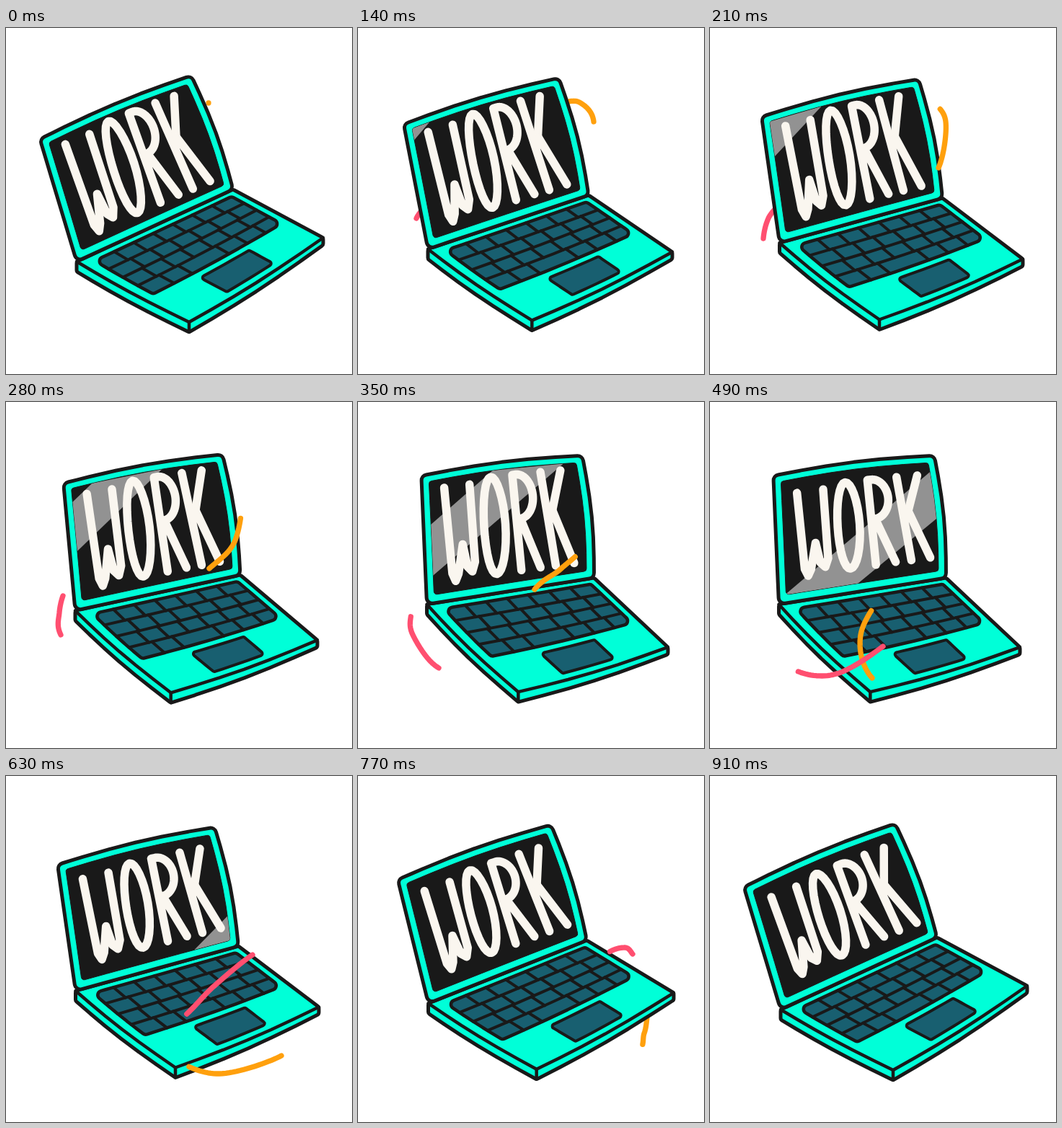
An HTML page with a canvas for the animation above (980 ms loop, 480 by 480 pixels).

```html
<!DOCTYPE html>
<html lang="en">
<head>
<meta charset="utf-8">
<title>Work</title>
<style>
html, body { margin: 0; width: 100%; height: 100%; overflow: hidden; background: #fff; }
canvas { display: block; width: 480px; height: 480px; }
</style>
</head>
<body>
<canvas id="stage" width="480" height="480"></canvas>
<script>
const ctx = document.getElementById('stage').getContext('2d');
const STEP = 70, STEPS = 14;
const INK = '#191919', MINT = '#00ffd8', TEAL = '#185f70', CREAM = '#faf6ef';

const mix = (a, b, t) => a + (b - a) * t;
const mixPoint = (p, q, t) => [mix(p[0], q[0], t), mix(p[1], q[1], t)];
const range = n => Array.from({ length: n }, (_, i) => i);

// Laptop corners at both ends of the swing.
const corners = {
  lidLeft: [[47, 154], [96, 92]],
  lidRight: [[257, 66], [322, 76]],
  hingeLeft: [[98, 324], [95, 272]],
  hingeRight: [[315, 224], [330, 248]],
  front: [[254, 408], [216, 401]],
  right: [[440, 291], [428, 350]]
};

// Streak paths: one knot for every step of the leading end.
const orange = {
  color: '#ffa00d', first: 0, lag: 1.5, frontFrom: 3, frontTo: 9,
  knots: [[281, 104], [307, 103], [327, 130], [317, 194], [282, 231], [245, 260],
    [209, 323], [225, 383], [292, 413], [382, 388], [397, 357], [401, 335]]
};
const pink = {
  color: '#ff4f70', first: 1, lag: 1.8, frontFrom: 6, frontTo: 11,
  knots: [[95, 246], [81, 264], [74, 292], [76, 323], [112, 369], [172, 378],
    [240, 339], [288, 292], [342, 248], [370, 238], [381, 247]]
};

// Maps (u, v) into a four-cornered surface whose sides bow outwards.
function surface([a, b, c, d], bow) {
  return (u, v) => {
    const [x, y] = mixPoint(mixPoint(a, b, u), mixPoint(d, c, u), v);
    const across = Math.sin(Math.PI * u), down = Math.sin(Math.PI * v);
    return [x + down * mix(-bow.left, bow.right, u), y + across * mix(-bow.top, bow.bottom, v)];
  };
}

const inset = (map, u0, v0, u1, v1) => (u, v) => map(mix(u0, u1, u), mix(v0, v1, v));

const sidePoints = (map, u0, v0, u1, v1) =>
  range(7).map(i => map(mix(u0, u1, i / 6), mix(v0, v1, i / 6)));

const outline = map => [
  ...sidePoints(map, 0, 0, 1, 0).slice(1), ...sidePoints(map, 1, 0, 1, 1).slice(1),
  ...sidePoints(map, 1, 1, 0, 1).slice(1), ...sidePoints(map, 0, 1, 0, 0).slice(1)
];

function trace(points, radius) {
  ctx.beginPath();
  ctx.moveTo(...mixPoint(points[points.length - 1], points[0], .5));
  points.forEach((p, i) => ctx.arcTo(...p, ...points[(i + 1) % points.length], radius));
  ctx.closePath();
}

function shape(points, radius, fill, width) {
  trace(points, radius);
  ctx.fillStyle = fill;
  ctx.fill();
  ctx.strokeStyle = INK;
  ctx.lineWidth = width;
  ctx.stroke();
}

function line(points, color, width) {
  ctx.beginPath();
  points.forEach(p => ctx.lineTo(...p));
  ctx.strokeStyle = color;
  ctx.lineWidth = width;
  ctx.stroke();
}

// Catmull-Rom curve; s counts knots.
function along(knots, s) {
  const i = Math.min(Math.floor(s), knots.length - 2), t = s - i;
  const p = n => knots[Math.max(0, Math.min(knots.length - 1, i + n))];
  return [0, 1].map(k => {
    const a = p(-1)[k], b = p(0)[k], c = p(1)[k], d = p(2)[k];
    return b + t / 2 * (c - a + t * (2 * a - 5 * b + 4 * c - d + t * (3 * (b - c) + d - a)));
  });
}

function drawStreak({ color, first, lag, knots, frontFrom, frontTo }, step, front) {
  const head = step - first, tail = Math.max(0, head - lag);
  if (head < 0 || head >= knots.length) return;
  if (front !== (step >= frontFrom && step <= frontTo)) return;
  line(range(31).map(i => along(knots, mix(tail, head, i / 30))), color, 7.3);
}

function drawBase(at) {
  const plate = surface([at.hingeLeft, at.hingeRight, at.right, at.front],
    { top: 0, right: 0, bottom: 4, left: 5 });
  const edge = [...sidePoints(plate, 0, 0, 0, 1), ...sidePoints(plate, 0, 1, 1, 1).slice(1)];
  const underside = edge.map(([x, y], i) => [x, y + (i < 7 ? 14 : mix(14, 10, (i - 6) / 6))]);
  shape([...underside, at.right, at.hingeRight, at.hingeLeft], 4, MINT, 5);
  line(edge, INK, 4.5);
  line([edge[6], underside[6]], INK, 4.5);

  const keys = inset(plate, .07, .07, .95, .62);
  shape(outline(keys), 6, TEAL, 4.5);
  for (let row = 0; row < 4; row++) {
    const top = row / 4, bottom = top + .25;
    if (row) line(sidePoints(keys, 0, top, 1, top), INK, 4);
    for (let key = 1; key < 7; key++) {
      const u = key / 7 + .02 * (row % 2), spaceBar = row === 3 && key === 3;
      if (!spaceBar) line([keys(u, top), keys(u, bottom)], INK, 4);
    }
  }
  shape(outline(inset(plate, .34, .69, .68, .93)), 3, TEAL, 4);
}

function drawGlare(screen, step) {
  const trail = -.75 + .17 * step + .0133 * step * step, lead = trail + .48;
  ctx.save();
  trace(outline(screen), 4);
  ctx.clip();
  ctx.beginPath();
  [trail, lead].forEach(u => ctx.lineTo(...screen(u, 0)));
  [lead, trail].forEach(u => ctx.lineTo(...screen(u - 1.1, 1)));
  ctx.fillStyle = '#929292';
  ctx.fill();
  ctx.restore();
}

function drawWord(screen, small) {
  const area = small ? inset(screen, 0, .055, 1.03, .945) : screen;
  const stroke = points => line(points.map(p => area(...p)), CREAM, 11.5);
  const arc = (u, v, ru, rv, from, to) => range(33).map(i => {
    const a = mix(from, to, i / 32) * Math.PI;
    return [u + ru * Math.cos(a), v + rv * Math.sin(a)];
  });
  stroke([[.1, .08], [.125, .84], [.145, .91], [.165, .85], [.2, .6],
    [.225, .8], [.255, .85], [.275, .77], [.27, .09]]);
  stroke(arc(.415, .48, .07, .425, 0, 2));
  stroke([[.575, .905], [.56, .06], ...arc(.585, .255, .095, .195, -.5, .5), [.59, .47], [.7, .905]]);
  stroke([[.75, .06], [.8, .91]]);
  stroke([[.885, .06], [.78, .49]]);
  stroke([[.8, .42], [.92, .91]]);
}

function drawLid(at, step) {
  const lid = surface([at.lidLeft, at.lidRight, at.hingeRight, at.hingeLeft],
    { top: 5, right: 5, bottom: 0, left: 0 });
  const screen = inset(lid, .045, .055, .955, .935);
  shape(outline(lid), 8, MINT, 5);
  shape(outline(screen), 4, INK, 1);
  drawGlare(screen, step);
  drawWord(screen, step > 6);
}

function draw(now) {
  const step = Math.floor(now / STEP) % STEPS;
  const swing = Math.max(0, 1 - Math.abs(step - 6) / 6);
  const at = {};
  for (const name in corners) at[name] = mixPoint(...corners[name], swing);
  ctx.fillStyle = '#fff';
  ctx.fillRect(0, 0, 480, 480);
  ctx.lineCap = ctx.lineJoin = 'round';
  [orange, pink].forEach(s => drawStreak(s, step, false));
  drawBase(at);
  drawLid(at, step);
  [orange, pink].forEach(s => drawStreak(s, step, true));
}

const start = performance.now();
function tick() {
  draw(performance.now() - start);
  requestAnimationFrame(tick);
}
tick();
</script>
</body>
</html>
```
